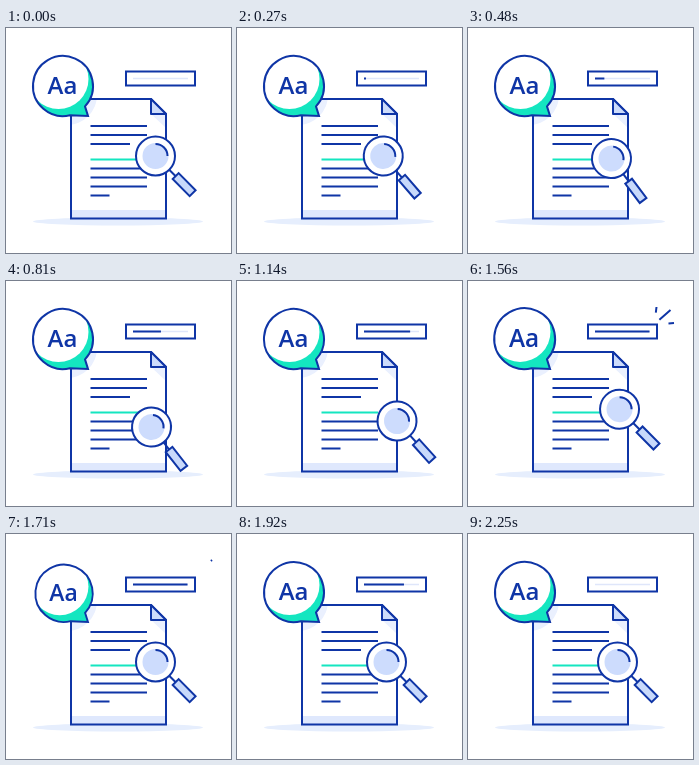
Recreate the animation shown at these times as an HTML page. Size 225 by 225 pixels, loop 2.7 s.

```html
<!DOCTYPE html>
<html lang="en">
<head>
<meta charset="utf-8">
<style>
  html, body { margin: 0; width: 100%; height: 100%; overflow: hidden; background: #fff; }
  svg { display: block; width: 100%; height: 100%; }
  .ink { stroke: #0f35a6; stroke-width: 2; }
  text { font: 600 24px "Open Sans", "Noto Sans", sans-serif; fill: #0f35a6; text-anchor: middle; }
</style>
</head>
<body>
<svg viewBox="0 0 225 225" fill="none">
  <defs>
    <path id="page" d="M65 71H145L160 86V190.5H65Z"/>
    <path id="balloon" d="M79 78.4A30 30 0 1 0 64 87.2L82 88Z"/>
    <clipPath id="pageClip"><use href="#page"/></clipPath>
    <clipPath id="balloonClip"><use href="#balloon"/></clipPath>
  </defs>

  <ellipse cx="112" cy="193.5" rx="85" ry="4" fill="#e6eefd"/>
  <use href="#page" fill="#fff"/>
  <g clip-path="url(#pageClip)">
    <path d="M65 182H160V191H65Z" fill="#dfe8fd"/>
    <path d="M145 86H160V100Z" fill="#eaf0fe"/>
    <circle cx="61" cy="67" r="30" fill="#eaf0fe"/>
  </g>
  <use href="#page" class="ink"/>
  <path d="M145 71V86H160Z" fill="#cddcfb" class="ink" stroke-linejoin="round"/>
  <path d="M84.500 98H141M84.500 107H141M84.500 116H124M84.500 140.500H141M84.500 149.500H141M84.500 158.500H141M84.500 167.500H103.500" class="ink"/>
  <path d="M84.500 131.500H141" stroke="#14e6c0" stroke-width="2"/>

  <rect x="120" y="43.500" width="69" height="14" fill="#fff" class="ink"/>
  <path d="M127 50.500H182" stroke="#dfe6fa" stroke-width="1.500"/>
  <path id="progress" class="ink"/>
  <path id="rays" class="ink"/>

  <g id="bubble">
    <use href="#balloon" fill="#14e6c0"/>
    <circle cx="52.500" cy="51" r="30" fill="#fff" clip-path="url(#balloonClip)"/>
    <use href="#balloon" class="ink"/>
    <text x="56.500" y="66">Aa</text>
  </g>

  <g id="glass">
    <path d="M19 0H29" class="ink"/>
    <rect x="28.500" y="-4.200" width="24" height="8.400" fill="#c8d9fb" class="ink"/>
    <circle r="19.500" fill="#fff" class="ink"/>
    <circle r="13" fill="#cddcfd"/>
    <path d="M8.500 -8.500A12 12 0 0 0 -8.500 -8.500" class="ink" transform="rotate(0)"/>
  </g>
</svg>
<script>
const LOOP = 2700;
const $ = id => document.getElementById(id);
const clamp = v => Math.min(1, Math.max(0, v));
const ease = v => (1 - Math.cos(Math.PI * clamp(v))) / 2;
const ramp = (t, from, to) => ease((t - from) / (to - from));

// time, x, y, angle
const glassKeys = [
  [0, 149.5, 128, 45], [480, 143.5, 130.5, 53], [810, 145.5, 146, 52],
  [1140, 160, 140, 48], [1410, 155, 130, 46], [1710, 149.5, 128, 45]
];
// time, scale
const popKeys = [[1140, 1], [1345, 1.14], [1695, 0.955], [1950, 1]];
// start x, start y, end x, end y, first and last moment
const rayKeys = [
  [187, 38, 188.5, 26, 1390, 1640],
  [190, 40, 206, 26, 1400, 1750],
  [194, 43, 206, 42, 1390, 1640]
];

function spline(keys, t, col) {
  const last = keys.length - 1;
  if (t >= keys[last][0]) return keys[last][col];
  const i = keys.findIndex(k => k[0] > t) - 1;
  const slope = n => n === 0 || n === last ? 0 :
    (keys[n + 1][col] - keys[n - 1][col]) / (keys[n + 1][0] - keys[n - 1][0]);
  const [a, b] = [keys[i], keys[i + 1]];
  const span = b[0] - a[0], u = (t - a[0]) / span, w = 1 - u;
  return a[col] * (1 + 2 * u) * w * w + slope(i) * span * u * w * w
    + b[col] * u * u * (3 - 2 * u) - slope(i + 1) * span * u * u * w;
}

function popScale(t) {
  let scale = 1;
  for (let i = 1; i < popKeys.length; i++) {
    const [a, b] = [popKeys[i - 1], popKeys[i]];
    scale += (b[1] - a[1]) * ramp(t, a[0], b[0]);
  }
  return scale;
}

function ray([x0, y0, x1, y1, from, to], t) {
  const u = (t - from) / (to - from);
  if (u <= 0 || u >= 1) return "";
  const head = ease(u * 1.5), tail = ease(u * 1.5 - 0.5);
  const at = k => `${x0 + (x1 - x0) * k} ${y0 + (y1 - y0) * k}`;
  return `M${at(tail)}L${at(head)}`;
}

function draw(now) {
  const t = now % LOOP;
  const [x, y, angle] = [1, 2, 3].map(col => spline(glassKeys, t, col));
  $("glass").setAttribute("transform", `translate(${x} ${y}) rotate(${angle})`);
  $("bubble").setAttribute("transform", `translate(81 87) scale(${popScale(t)}) translate(-81 -87)`);
  const length = 54.5 * (ramp(t, 100, 1500) - ramp(t, 1750, 2245));
  $("progress").setAttribute("d", length > 0.05 ? `M127 50.500h${length}` : "");
  $("rays").setAttribute("d", rayKeys.map(k => ray(k, t)).join(""));
  requestAnimationFrame(draw);
}
draw(performance.now());
</script>
</body>
</html>
```
